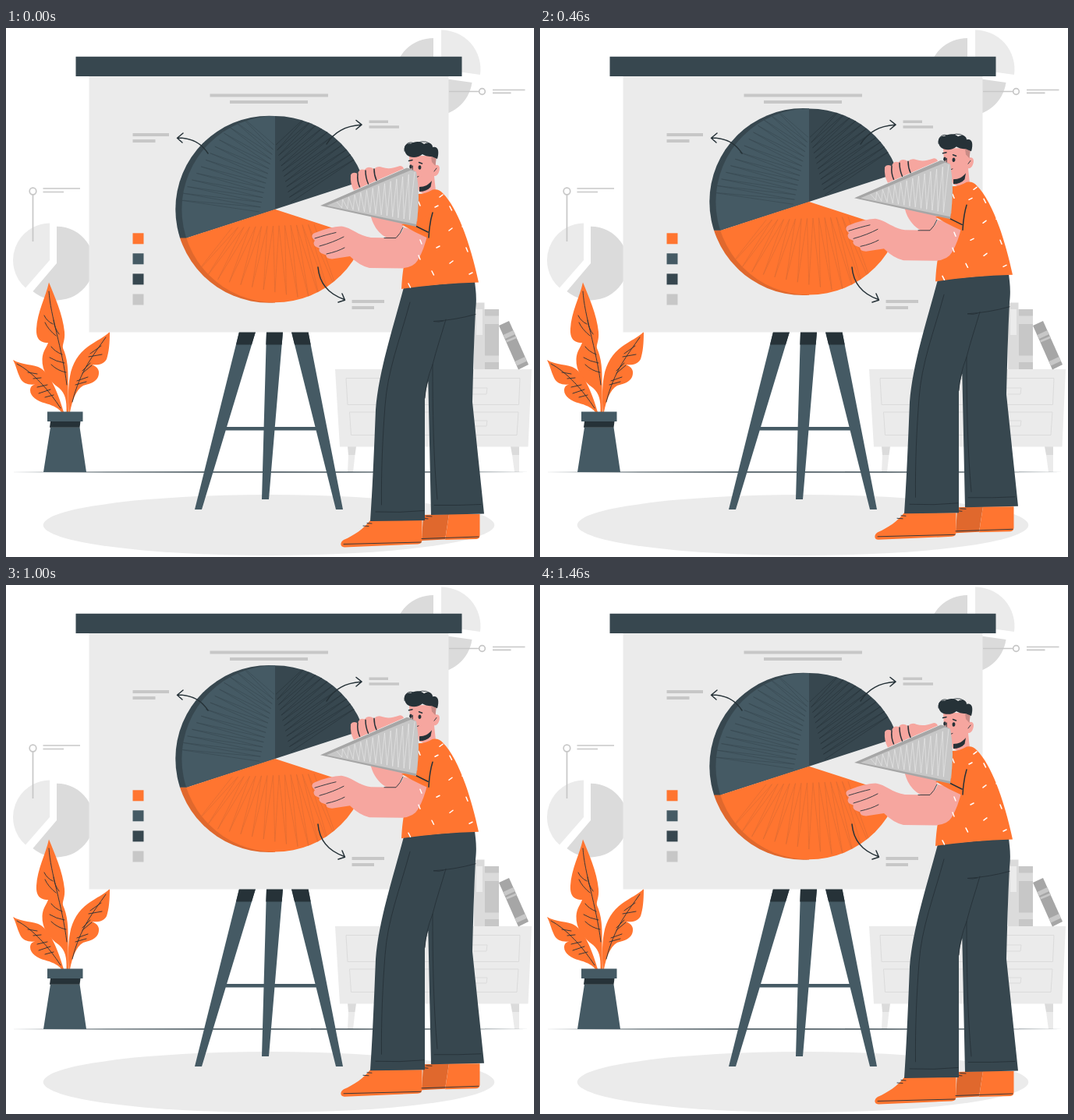
Animation, 677 px wide and 679 px high, one loop 1500 ms. Source, as an HTML page:

```html
<!DOCTYPE html>
<html lang="en">
<head>
<meta charset="utf-8">
<title>Pie chart presentation</title>
<style>
html, body { margin: 0; width: 100%; height: 100%; overflow: hidden; background: #fff; }
svg { display: block; width: 100%; height: 100%; }
.o { fill: #ff7530; } .od { fill: #e0682d; }
.s { fill: #455a64; } .d { fill: #37474f; } .k { fill: #263238; }
.g1 { fill: #ebebeb; } .g2 { fill: #dbdbdb; } .g3 { fill: #c7c7c7; } .g4 { fill: #a6a6a6; }
.skin { fill: #f6a69f; }
.ink, .thin { fill: none; stroke: #263238; stroke-linecap: round; stroke-linejoin: round; }
.ink { stroke-width: 1.5; } .thin { stroke-width: .9; }
.gl { fill: none; stroke: #c7c7c7; stroke-width: 1.7; }
.hatch { fill: none; stroke-width: .6; stroke-linejoin: round; }
</style>
</head>
<body>
<svg viewBox="0 0 677 679">
  <defs>
    <clipPath id="disc"><circle cx="345" cy="232.7" r="119.6"/></clipPath>
    <clipPath id="upper"><path d="M200 100H345V233L231 269.500H200Z"/></clipPath>
    <clipPath id="lower"><path d="M200 269H345V360H200Z"/></clipPath>
  </defs>

  <!-- background charts -->
  <path class="g2" d="M548 63L597.500 70A50 50 0 1 1 548 13Z"/>
  <path class="g1" d="M558 53V2.500A50.500 50.500 0 0 1 608 60Z"/>
  <path class="g1" d="M56 298L25 333.500A47.500 47.500 0 0 1 56 250.500Z"/>
  <path class="g2" d="M65 302V254.800A47.300 47.300 0 1 1 34.500 338Z"/>
  <path class="gl" d="M34.500 214V274M47.500 206H95M47.500 210.500H74M624 79.500H665.500M624 83.300H647.500"/>
  <circle class="gl" cx="34.500" cy="209.500" r="4.300" style="fill:#fff"/>

  <ellipse class="g1" cx="337" cy="638" rx="289.300" ry="39"/>

  <!-- cabinet and books -->
  <path class="g2" d="M438 537H449L447.500 548H439ZM647 537H658V548H649Z"/>
  <path class="g1" d="M422 438H674L669.500 537.500H428ZM439 548H447.500L445 570H438ZM649 548H658V570H652Z"/>
  <path d="M436 449.500H659L657.500 483.500H438ZM440.500 493H657L655 522.500H442.500ZM585 462H617L616 470H586ZM585 504H617L616 511H586Z" fill="none" stroke="#dbdbdb"/>
  <path class="g2" d="M600 352.500H613.500V438H600Z"/>
  <path class="g1" d="M603 361H611V394H603Z"/>
  <path class="g3" d="M613.500 361H632V438H613.500Z"/>
  <path class="g2" d="M613.500 369.500H632V380H613.500ZM613.500 420.500H632V429H613.500Z"/>
  <path class="g4" d="M632 382L645 376L670 432L657 438.500Z"/>
  <path class="g3" d="M637.500 394L650.500 388L653 393L640 399ZM641 401L654 395.500L655 398L642 403.500ZM652.500 428L665.500 422L668 427.500L655 433.500Z"/>

  <path class="d" d="M3 570Q337 568.300 672 570Q337 571.700 3 570Z"/>

  <!-- plant -->
  <g class="o">
    <path d="M55 326.500C62 344 73 368 75 390C76 402 72 405 73 411C79 424 80 440 79.500 458L80 493H77.500C78 478 76 469 68 462C54 452 46 440 46.500 425C47 415 52 410 54 404C47 404 38 402 39 386C40 365 51 345 55 326.500Z"/>
    <path d="M133 390C133 405 132 416 129 425C125 432 118 433 110 432C118 435 121 440 118 448C114 456 105 457 99 459C90 464 85 478 82 493H80.500C80 480 79 462 82 447C85 430 93 418 105 409C116 401 126 397 133 390Z"/>
    <path d="M9 426C20 433 36 431 45 437C59 447 68 473 74 493H71C65 486 58 484 50 481.500C40 479 31 473 31 465C31 459 36 457 41 457C30 459 22 457 18 449C14 441 13 433 9 426Z"/>
  </g>
  <path class="thin" d="M55 338C57 370 72 410 78 458M64 395Q54 387 50 378M68 393Q62 385 61 375M60 380Q52 376 49 369M72 419Q62 415 58 409M75 430Q64 428 56 423M77 442Q66 440 58 432
    M128 397C112 420 95 440 85 480M122 408L108 418M123 419L106 422M108 430L98 440M110 433L98 443M105 448L91 453M103 454L89 458
    M14 431C35 442 55 465 70 488M40 444L28 442M45 449L35 450M53 458L40 461M57 464L42 469M61 471L50 474"/>
  <path class="s" d="M53 492.500H98.500V505H53ZM57 512.500H94.500L103 570H48Z"/>
  <path class="k" d="M57 505H95.500L94.500 512.800H56Z"/>

  <!-- easel -->
  <path class="s" d="M281 512H400V516.500H281ZM299 390H320L251 618H242ZM334 390H355L337 605H328ZM366 390H387.500L432 618H423Z"/>
  <path class="k" d="M299 390H320L315 406.500H295ZM334 390H355L353.700 406.500H333.300ZM366 390H387.500L390.700 406.500H370Z"/>
  <path class="g1" d="M106.500 62H567.500V390.500H106.500Z"/>
  <path class="d" d="M89.500 36.700H584.500V62H89.500Z"/>
  <path class="gl" d="M568 81.500H606"/>
  <circle class="gl" cx="610.500" cy="81.500" r="3.800" style="fill:#fff"/>
  <path class="g3" d="M261.500 84.500h151.500v4H261.500ZM287 93h100v4H287ZM162.500 135h46.500v4h-46.500ZM162.500 143h29v4h-29ZM465.500 118.500h24.500v3.500h-24.500ZM465.500 125.300h38.500v3.500h-38.500ZM443.500 349h41.500v4h-41.500ZM443.500 357h28.500v4h-28.500ZM162.500 341.500h14v14h-14Z"/>
  <path class="o" d="M162.500 263.300h14v14h-14Z"/>
  <path class="s" d="M162.500 289.300h14v14h-14Z"/>
  <path class="d" d="M162.500 315.400h14v14h-14Z"/>

  <!-- pie -->
  <g class="float">
    <circle class="od" cx="337.300" cy="232.700" r="120" clip-path="url(#lower)"/>
    <circle class="d" cx="337.300" cy="232.700" r="120" clip-path="url(#upper)"/>
    <g clip-path="url(#disc)">
      <path class="s" d="M345 232.700V100H200V279.800Z"/>
      <path class="o" d="M345 232.700L200 279.800V360H490V279.800Z"/>
      <path class="d" d="M345 232.700V100H490V185.600Z"/>
      <path class="hatch" id="slateHatch" stroke="#37474f"/>
      <path class="hatch" id="darkHatch" stroke="#263238"/>
      <path class="hatch" id="orangeHatch" stroke="#d96a33"/>
    </g>
  </g>

  <!-- arrows -->
  <path class="ink" d="M259 161C250 147 238 141 220 141M227 135L219.500 141.300L226 147M411 149C421 133 435 126 455 124.300M449 118.500L456 124.200L449 130M400 307C402 330 415 342 434 348.500M431 341L434.500 349.200L426 352"/>

  <!-- presenter -->
  <g class="float">
    <path class="od" d="M535 625L568 624L563 656.500L533 658Z"/>
    <path class="o" d="M568 624H607.500V651Q607.500 655.500 603 656L563 657Z"/>
    <path class="o" d="M467 632H533.500V657Q533.500 662 528 662.500L434 666.500C428 666.500 428 660 433 657C447 651 458 643 467 632Z"/>
    <path class="thin" d="M433 662.500L532 660M533 655.500L606 653M463 635.500L469 636M458 639L465 639.500M539 626.500L546 627M536 629.500L541 630"/>

    <path class="d" d="M541 440L545 625L613 623.500L598 480C599 440 600 400 602 362C604 345 602 335 601 325L510 333C495 390 478 440 474 490C472 540 470 590 467 633L537 632V475C538 462 544 445 547 432Z"/>
    <path class="thin" d="M518 352C505 400 489 440 486 485C483 525 481 565 481.500 612M602 367.500Q575 375 548 376.500Q555 378 561 376M564 374C558 395 552 412 547 432Q538 455 537 475M547 432C547 490 548 550 553 605M474 621Q505 622.500 536 619.500M549 612.500Q580 613 609 611.500"/>

    <!-- far arm -->
    <path class="skin" d="M467 238C470 255 480 266 490 270L502 271L513 245Z"/>

    <!-- head -->
    <path class="skin" d="M517 164H551V176C556 175 557 180 555 185C553 190 550 190 549 190L551 209Q540 217 530 210L520 196L521 188L518 181Z"/>
    <path fill="#c98b86" d="M545 165H552L550.500 177L546 172Z"/>
    <path class="k" d="M530 204C537 204 542 201 546 196L544.500 204C541 208 536 210 530 210Z"/>
    <path class="k" d="M514 163C508 156 511 147 519 148.500C524 145 532 145 536 149C541 146 547 148 547 153C554 151 556 158 553 168L546 165C540 165 537 164 534 162C528 167 519 167 514 163Z"/>
    <path class="thin" d="M511 158C510 148 518 145 523 148M528 147Q540 143 546 151M521.500 177L521 186L523.500 188M525 192L529 190.500M549 184L552 180"/>
    <path class="ink" d="M516.500 170.500L521 169.500M529.500 172.500L533.500 174"/>
    <ellipse class="k" cx="519" cy="178" rx="1.800" ry="2.700"/>
    <ellipse class="k" cx="530.500" cy="179" rx="1.900" ry="2.800"/>

    <path class="o" d="M528 213Q538 213 547 207.500Q555 206 560 212C580 232 596 280 606 326.500Q555 328 507 335Q508 315 511 300L527 255Z"/>

    <!-- near arm -->
    <path class="skin" d="M510 256L541 263Q536 285 528 298Q523 307 508 308.500L466 308Q453 305 441 293L418 296.500Q410 296 410.500 291.500L404 289Q400 286 402 283L396 280Q393 276 396 273L393 269.500Q391 265 396 263Q415 255 430 254.500C443 256 452 267 468 269L500 269.500Q507 264 510 256Z"/>
    <path class="thin" d="M396 270Q412 265 423 262.500M402 280Q420 275 433 268M411 290Q425 287 434 282M485 269.500L500 269.500Q506 264 509 256"/>
    <path class="o" d="M527 248L507 252Q523 262 541.500 270L547 237Z"/>
    <path class="ink" d="M547 237Q543 250 542 269M526 254.500L541 262"/>
    <path id="flecks" fill="none" stroke="#fff" stroke-width="1.500" stroke-linecap="round"/>

    <!-- removed slice and gripping hand -->
    <path class="g4" d="M403 228L514 179.500L520 181L526 185Q531 220 526 255Z"/>
    <path class="g3" d="M411 228L519 182.500L526 184.500Q532 217 526 252Z"/>
    <path class="hatch" id="sliceHatch" stroke="#ebebeb"/>
    <path class="skin" d="M510 180.500L446 208.500Q441 200 442 188.500Q444 184 451 187Q453 180 460 182Q464 176 472 181Q476 176 483 179Q492 182 505 177Q509 177 510 180.500Z"/>
    <path class="ink" d="M451 187Q450 196 453.500 204M461 183Q461 192 464.500 200M472 181Q472 189 475 195.500"/>
  </g>
</svg>
<script>
const byId = id => document.getElementById(id);
const lerp = (a, b, u) => (a + (b - a) * u).toFixed(1);

// Scribble back and forth between two guide segments [x0, y0, x1, y1].
function zigzag(id, p, q, count) {
  let d = '';
  for (let i = 0; i <= count; i++) {
    const g = i % 2 ? q : p, u = i / count;
    d += (i ? 'L' : 'M') + lerp(g[0], g[2], u) + ' ' + lerp(g[1], g[3], u);
  }
  byId(id).setAttribute('d', d);
}
zigzag('slateHatch', [344, 150, 325, 236], [300, 105, 218, 225], 28);
zigzag('darkHatch', [346, 150, 365, 224], [385, 108, 452, 170], 22);
zigzag('orangeHatch', [290, 256, 395, 252], [235, 315, 440, 360], 28);
zigzag('sliceHatch', [424, 223, 524, 185], [427, 230, 521, 247], 26);

const flecks = [[529, 223], [550, 230], [569, 229], [568, 260], [529, 292], [552, 282], [546, 312],
  [569, 302], [590, 282], [594, 316], [516, 328], [556, 217], [531, 272], [585, 255]];
byId('flecks').setAttribute('d', flecks.map(([x, y], i) =>
  `M${x} ${y}l${[2, 4, 2.5, 4][i % 4]} ${[5, -2, 5, -3][i % 4]}`).join(''));

const LOOP = 1500, RISE = 15.8, PHASE = 18, REST = 0.4;
const floating = document.querySelectorAll('.float');

// Steady rise for half the loop, then a steady fall.
function render(now) {
  const t = (now + PHASE) % LOOP / LOOP;
  const y = (REST - RISE * (1 - Math.abs(2 * t - 1))).toFixed(2);
  floating.forEach(el => el.setAttribute('transform', `translate(0 ${y})`));
}

const start = performance.now();
function tick() {
  render(performance.now() - start);
  requestAnimationFrame(tick);
}
tick();
</script>
</body>
</html>
```
